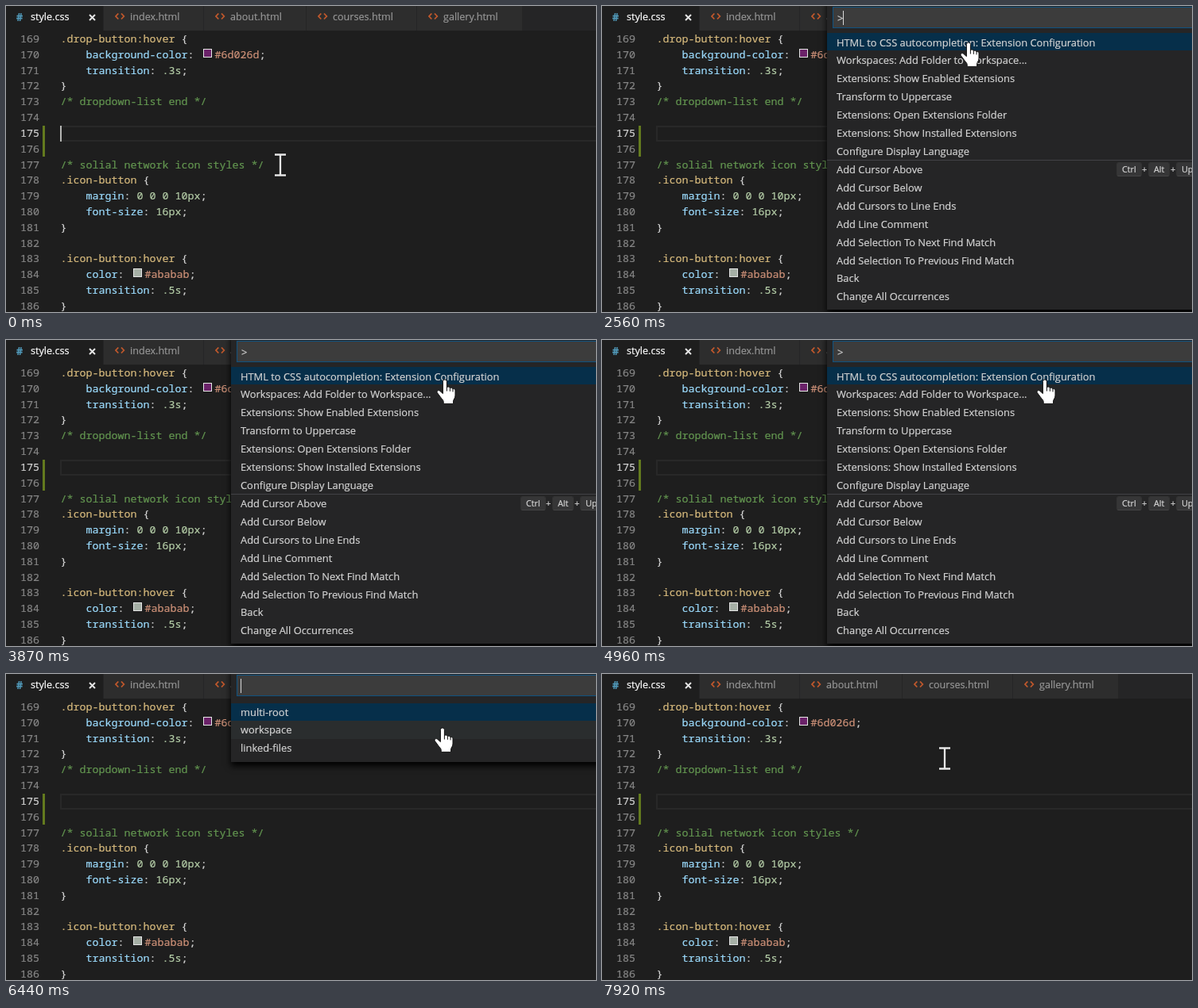
Recreate the animation shown at these times as an HTML page. Size 742 px wide and 386 px high, loop 8000 ms.

```html
<!DOCTYPE html>
<html lang="en">
<head>
<meta charset="utf-8">
<title>Stylesheet editor</title>
<style>
html, body { margin: 0; width: 100%; height: 100%; overflow: hidden; background: #1e1e1e; }
#stage { position: relative; width: 742px; height: 386px; overflow: hidden; background: #1e1e1e;
  font: 12.88px "Open Sans", "Noto Sans", sans-serif; color: #d4d4d4; -webkit-text-stroke: .2px; }
#stage div, #stage pre, #stage svg, kbd { position: absolute; margin: 0; white-space: pre; }

/* tabs */
.tabs { left: 0; top: 0; width: 742px; height: 31px; background: #252526; }
.tab { top: 0; height: 31px; background: #2d2d2d; color: #969696; font-size: 12.6px; line-height: 28px; }
.tab span { position: absolute; left: 33px; }
.tab svg { left: 14px; top: 9px; fill: none; stroke: #c0582c; stroke-width: 1.8; }
.tab.on { background: #1e1e1e; color: #fff; }
.tab.on span { left: 31px; }
.tab.on b { position: absolute; left: 13px; font: bold 13.5px/28px "Noto Sans Mono", monospace; color: #519aba; }
.tab.on svg { left: 104px; top: 10px; stroke: #e4e4e4; stroke-width: 2; }

/* code */
pre { top: 32px; font: 13.33px/19.82px "Noto Sans Mono", "DejaVu Sans Mono", monospace; }
.nums { left: 0; width: 42px; text-align: right; color: #858585; }
.nums b { font-weight: normal; color: #d0d0d0; }
.code { left: 68.6px; color: #d4d4d4; }
.s { color: #d7ba7d; } .p { color: #9cdcfe; } .n { color: #b5cea8; } .h { color: #ce9178; } .c { color: #639650; }
.code u { display: inline-block; box-sizing: border-box; width: 11px; height: 11px; margin: 0 4px 1px 3px; border: 1px solid #e6e6e6; }
.line { left: 68px; top: 151px; width: 680px; height: 20px; box-sizing: border-box; border: 2px solid #282828; }
.added { left: 46px; top: 151px; width: 3px; height: 39px; background: #637a1e; }
.edit-caret { left: 68px; top: 151px; width: 2px; height: 20px; background: #b4b5b3; animation: edit-caret 8s step-end infinite; }

/* quick pick */
.panel { left: 283px; top: -10px; width: 480px; box-sizing: border-box; background: #252526;
  box-shadow: 0 5px 8px #000; opacity: 0; animation: 8s step-end infinite; }
.input { left: 7px; top: 11px; width: 480px; height: 27px; box-sizing: border-box; border: 1px solid #0f5280;
  background: #3c3c3c; padding: 3px 5px; line-height: 20px; }
.rows { left: 0; top: 46.6px; width: 480px; line-height: 22.83px; }
.rows p { position: relative; margin: 0; padding-left: 12px; height: 22.83px; }
.rows p.cut { border-top: 1px solid #414146; }
.rows p.sel { background: #062f4a; }
.hover { left: 0; top: 0; width: 480px; height: 22.83px; background: #2a2d2e; opacity: 0; }
kbd { top: 207px; height: 18px; box-sizing: border-box; padding: 0 6px; border-radius: 3px; border: 1px solid #333;
  border-bottom-color: #454545; background: #363637; font: 10.8px/16px "Open Sans", "Noto Sans", sans-serif; }
.plus { top: 207px; font-size: 11px; line-height: 18px; }
.p1 { height: 393px; animation-name: p1; }
.p2 { height: 235px; animation-name: p2; }
.p3 { height: 121px; animation-name: p3; }
.p1 .rows { top: 44.6px; }
.p1 .rows .sel { margin: -1px 0 1px; padding-top: 1px; height: 21.83px; }
.p1 .hover { animation: sweep 8s step-end infinite; }
.p3 .hover { top: 22.83px; animation: hover 8s step-end infinite; }
.caret { left: 0; top: 6px; width: 1px; height: 18px; background: #d8d8d8; animation: caret 8s step-end infinite; }

/* pointer */
.pointer { left: 0; top: 0; animation: move 8s step-end infinite; }
.pointer svg { left: 0; top: 0; overflow: visible; }
.pointer .hand { left: 1px; top: 1px; animation: hand 8s step-end infinite; }
.beam { animation: beam 8s step-end infinite; }

@keyframes edit-caret { 0%, 6.625% { opacity: 1 } .875%, 12.375%, 100% { opacity: 0 } }
@keyframes p1 { 0%, 63%, 100% { opacity: 0 } 16.375% { opacity: 1 } }
@keyframes p2 { 0%, 74.625%, 100% { opacity: 0 } 63% { opacity: 1 } }
@keyframes p3 { 0%, 91.125%, 100% { opacity: 0 } 74.625% { opacity: 1 } }
@keyframes hand { 0%, 91.125%, 100% { opacity: 0 } 16.375% { opacity: 1 } }
@keyframes beam { 0%, 91.125%, 100% { opacity: 1 } 16.375% { opacity: 0 } }
@keyframes hover { 0%, 91.125%, 100% { opacity: 0 } 78.5% { opacity: 1 } }
@keyframes sweep {
  0% { opacity: 0; transform: translateY(159.81px) }
  21.375% { opacity: 1; transform: translateY(159.81px); animation-timing-function: steps(7, start) }
  31%, 100% { opacity: 0; transform: none }
}
@keyframes caret {
  0% { opacity: 0; transform: translateX(303px) }
  16.375%, 28.75%, 40.75%, 53% { opacity: 1; transform: translateX(303px) }
  22.5%, 35%, 47.375%, 58.875% { opacity: 0; transform: translateX(303px) }
  63%, 74.625%, 87.375% { opacity: 1; transform: translateX(295px) }
  69.75%, 81.5%, 91.125%, 100% { opacity: 0; transform: translateX(295px) }
}
@keyframes move {
  0% { transform: translate(344px, 200px) }
  20.41% { transform: translate(344px, 200px); animation-timing-function: steps(12) }
  31.96% { transform: translate(460px, 45px); animation-timing-function: steps(6) }
  37.75% { transform: translate(535px, 46px) }
  42.6% { transform: translate(524px, 46px); animation-timing-function: steps(3) }
  45.5% { transform: translate(573px, 48px); animation-timing-function: steps(3) }
  48.3% { transform: translate(551px, 49px); animation-timing-function: steps(7) }
  55.1% { transform: translate(556px, 49px) }
  73.6% { transform: translate(556px, 49px); animation-timing-function: steps(4) }
  77.6% { transform: translate(553px, 58px); animation-timing-function: steps(3) }
  80.4% { transform: translate(548px, 67px); animation-timing-function: steps(4) }
  84.25% { transform: translate(545px, 69px) }
  91.1% { transform: translate(545px, 69px); animation-timing-function: steps(3) }
  93.4% { transform: translate(534px, 80px) }
  94.3% { transform: translate(534px, 80px); animation-timing-function: steps(5) }
  98.9%, 100% { transform: translate(430px, 106px) }
}
</style>
</head>
<body>
<div id="stage">
  <svg width="0" height="0"><symbol id="tag" overflow="visible"><path d="M4.3 .5 1 4l3.3 3.5M8 .5 11.3 4 8 7.5"/></symbol></svg>

  <div class="tabs">
    <div class="tab on" style="left:0;width:122px"><b>#</b><span>style.css</span><svg width="9" height="9"><path d="M1 1l7 7M8 1 1 8"/></svg></div>
    <div class="tab" style="left:123px;width:125px"><svg width="13" height="9"><use href="#tag"/></svg><span>index.html</span></div>
    <div class="tab" style="left:249px;width:128px"><svg width="13" height="9"><use href="#tag"/></svg><span>about.html</span></div>
    <div class="tab" style="left:378px;width:138px"><svg width="13" height="9"><use href="#tag"/></svg><span>courses.html</span></div>
    <div class="tab" style="left:517px;width:132px"><svg width="13" height="9"><use href="#tag"/></svg><span>gallery.html</span></div>
  </div>

  <div class="line"></div>
  <div class="added"></div>
  <pre class="nums">169
170
171
172
173
174
<b>175</b>
176
177
178
179
180
181
182
183
184
185
186</pre>
  <pre class="code"><span class="s">.drop-button:hover</span> {
    <span class="p">background-color</span>: <u style="background:#6b2269"></u><span class="h">#6d026d</span>;
    <span class="p">transition</span>: <span class="n">.3s</span>;
}
<span class="c">/* dropdown-list end */</span>



<span class="c">/* solial network icon styles */</span>
<span class="s">.icon-button</span> {
    <span class="p">margin</span>: <span class="n">0 0 0 10px</span>;
    <span class="p">font-size</span>: <span class="n">16px</span>;
}

<span class="s">.icon-button:hover</span> {
    <span class="p">color</span>: <u style="background:#a5afa5"></u><span class="h">#ababab</span>;
    <span class="p">transition</span>: <span class="n">.5s</span>;
}</pre>
  <div class="edit-caret"></div>

  <div class="panel p1">
    <div class="input">&gt;</div>
    <div class="rows"><div class="hover"></div><p class="sel">HTML to CSS autocompletion: Extension Configuration</p><p>Workspaces: Add Folder to Workspace...</p><p>Extensions: Show Enabled Extensions</p><p>Transform to Uppercase</p><p>Extensions: Open Extensions Folder</p><p>Extensions: Show Installed Extensions</p><p>Configure Display Language</p><p class="cut">Add Cursor Above</p><p>Add Cursor Below</p><p>Add Cursors to Line Ends</p><p>Add Line Comment</p><p>Add Selection To Next Find Match</p><p>Add Selection To Previous Find Match</p><p>Back</p><p>Change All Occurrences</p></div>
    <kbd style="left:364px">Ctrl</kbd><div class="plus" style="left:396px">+</div>
    <kbd style="left:404px">Alt</kbd><div class="plus" style="left:432px">+</div>
    <kbd style="left:439px">UpArrow</kbd>
  </div>

  <div class="panel p2">
    <div class="input"></div>
    <div class="rows"><p class="sel">Set autocompletion workspace scope</p><p>Set file types to be searched for classes/ids</p><p>Set file types you want to provide classes/ids to</p><p>Set list of include folders</p><p>Set list of exclude folders</p><p>Set include glob pattern</p><p>Set exclude glob pattern</p><p>Restore configurations to default</p></div>
  </div>

  <div class="panel p3">
    <div class="input"></div>
    <div class="rows"><div class="hover"></div><p class="sel">multi-root</p><p>workspace</p><p>linked-files</p></div>
  </div>
  <div class="caret"></div>

  <div class="pointer">
    <svg class="hand" width="1" height="1" stroke="#111" stroke-linejoin="round">
      <path fill="#fff" d="M-2.6 2.4a2.5 2.5 0 0 1 5 0V10c.5-1.4 3.8-1.2 4 .8 .6-1.2 3.4-.8 3.6 1.2 .8-1 3-.4 3 1.8V20c0 3.4-2.2 4.6-2.4 7v3.4H-1.8V28c0-2.4-2.6-4-4.2-6.6l-3.6-4.8c-1.2-2 1.2-4 3.2-2.4l3.8 3.4z"/>
      <path fill="none" d="M2.4 10v4.5M6.4 10.8v4M10 12v3.4"/>
    </svg>
    <svg class="beam" width="1" height="1" fill="none">
      <path d="M-6 -12.5H8M1 -12V13M-6 13.5H8" stroke="#111" stroke-width="4"/>
      <path d="M-6 -12.5H8M1 -12V13M-6 13.5H8" stroke="#e6e6e6" stroke-width="2.4"/>
    </svg>
  </div>
</div>
</body>
</html>
```
